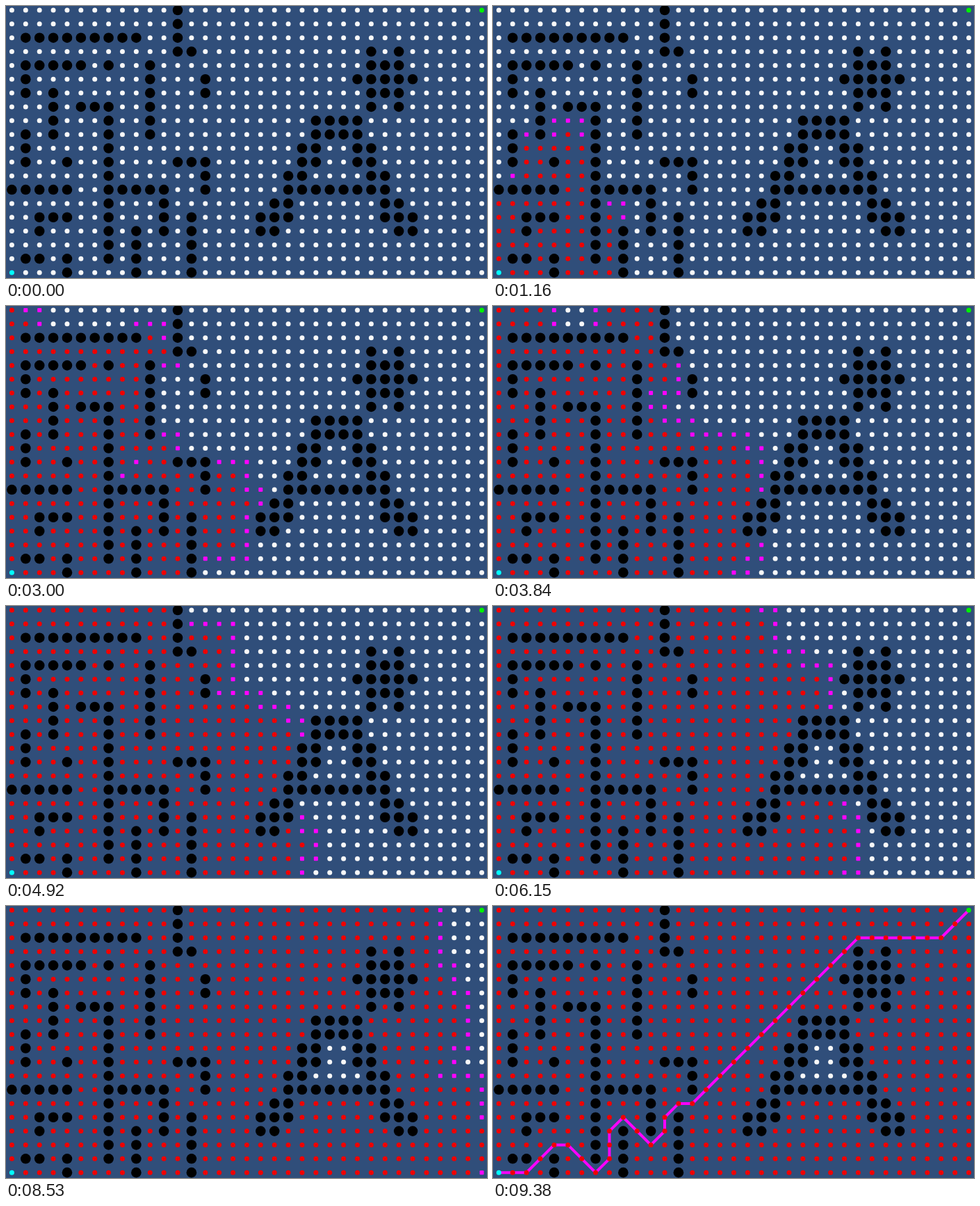
Write an HTML page with a canvas that moves like this. It is 692 px wide and 391 px high and loops after 9.84 s.

```html
<!DOCTYPE html>
<html lang="en">
<head>
<meta charset="utf-8">
<title>Shortest path search</title>
<style>
  html, body { margin: 0; width: 100%; height: 100%; overflow: hidden; background: #304e7a; }
  canvas { display: block; }
</style>
</head>
<body>
<canvas id="stage" width="692" height="391"></canvas>
<script>
const COLS = 35, ROWS = 20, LOOP = 9840, PATH_TIME = 9380;
const ctx = document.getElementById('stage').getContext('2d');
const px = c => 8.4 + c * 19.885;
const py = r => 6 + r * 19.85;

// Walls per row, as columns or column ranges
const wallRows = [
  '12', '12', '1-9 12', '12-13 26 28', '1-5 7 10 26-28', '1 10 14 25-29',
  '1 3 10 14 26-28', '3 5-7 10 26 28', '3 7 10 22-25', '1 3 7 10 22-25',
  '1 7 21-22 25-26', '1 4 7 12-14 21-22 25-26', '7 14 20-21 26-27',
  '0-4 7-11 14 20-27', '7 11 19-20 27-28', '2-4 7 11 13 18-20 27-29',
  '2 7 9 11 13 18-19 28-29', '7 9 13', '1-2 4 7 9 13', '4 9 13'
];
const wall = new Array(COLS * ROWS).fill(false);
wallRows.forEach((row, r) => row.split(' ').forEach(part => {
  const [a, b = a] = part.split('-').map(Number);
  for (let c = a; c <= b; c++) wall[r * COLS + c] = true;
}));

const start = (ROWS - 1) * COLS, goal = COLS - 1;

// Dijkstra on eight neighbours; notes when each node is opened and closed
function search() {
  const dist = new Array(COLS * ROWS).fill(Infinity);
  const opened = dist.slice(), closed = dist.slice();
  const queue = [start];
  let count = 0;
  dist[start] = opened[start] = 0;
  while (queue.length) {
    let best = 0;
    queue.forEach((n, i) => { if (dist[n] < dist[queue[best]] - 1e-9) best = i; });
    const node = queue.splice(best, 1)[0];
    closed[node] = ++count;
    const c = node % COLS, r = (node - c) / COLS;
    for (let dr = -1; dr <= 1; dr++) for (let dc = -1; dc <= 1; dc++) {
      const x = c + dc, y = r + dr, next = y * COLS + x;
      if (x < 0 || y < 0 || x >= COLS || y >= ROWS) continue;
      if (wall[next] || closed[next] < Infinity) continue;
      if (opened[next] === Infinity) {
        opened[next] = count;
        queue.push(next);
      }
      dist[next] = Math.min(dist[next], dist[node] + Math.hypot(dc, dr));
    }
  }
  return { opened, closed, count };
}
const { opened, closed, count } = search();

const route = [
  [0, 19], [2, 19], [4, 17], [5, 17], [7, 19], [8, 18], [8, 16], [9, 15],
  [11, 17], [12, 16], [12, 15], [13, 14], [14, 14], [26, 2], [32, 2], [34, 0]
];

// Redraw moments: first, last, number of steps
const ticks = [0, 70];
[[240, 1160, 13], [1240, 2150, 13], [2230, 3150, 13], [3230, 4150, 13],
 [4250, 5230, 14], [5300, 6230, 13], [6300, 7230, 13], [7300, 8230, 13],
 [8300, 9230, 13], [9300, 9380, 2]].forEach(([a, b, n]) => {
  for (let i = 0; i < n; i++) ticks.push(Math.round((a + (b - a) * i / (n - 1)) / 10) * 10);
});

function visitedAt(t) {
  if (t < 70) return 0;
  if (t < 240) return 2;
  if (t >= 9300) return count;
  return Math.min(count, Math.max(3, Math.round(122 + 0.0604 * (t - 2230))));
}

function dot(x, y, radius, color) {
  ctx.fillStyle = color;
  ctx.beginPath();
  ctx.arc(x, y, radius, 0, Math.PI * 2);
  ctx.fill();
}

function drawNode(i, visited) {
  const c = i % COLS, x = px(c), y = py((i - c) / COLS);
  if (wall[i]) dot(x, y, 7.3, '#000');
  else if (i === start) dot(x, y, 3.5, '#00ffff');
  else if (i === goal) dot(x, y, 3.5, '#00f000');
  else if (closed[i] <= visited) dot(x, y, 3.5, '#f00000');
  else if (visited && opened[i] <= visited) {
    ctx.fillStyle = '#ff00ff';
    ctx.beginPath();
    ctx.roundRect(x - 3, y - 3, 6, 6, 1);
    ctx.fill();
  } else dot(x, y, 3.5, '#f8f8f8');
}

function drawRoute() {
  ctx.strokeStyle = '#ff00ff';
  ctx.lineWidth = 4;
  ctx.beginPath();
  route.forEach(([c, r]) => ctx.lineTo(px(c), py(r)));
  ctx.stroke();
}

function draw(t) {
  const visited = visitedAt(t);
  ctx.fillStyle = '#304e7a';
  ctx.fillRect(0, 0, 692, 391);
  if (t >= PATH_TIME) drawRoute();
  for (let i = 0; i < COLS * ROWS; i++) drawNode(i, visited);
}

const origin = performance.now();
let shown = -1;
function frame() {
  const t = (performance.now() - origin) % LOOP;
  const tick = ticks.findLast(k => k <= t);
  if (tick !== shown) draw(shown = tick);
  requestAnimationFrame(frame);
}
frame();
</script>
</body>
</html>
```
